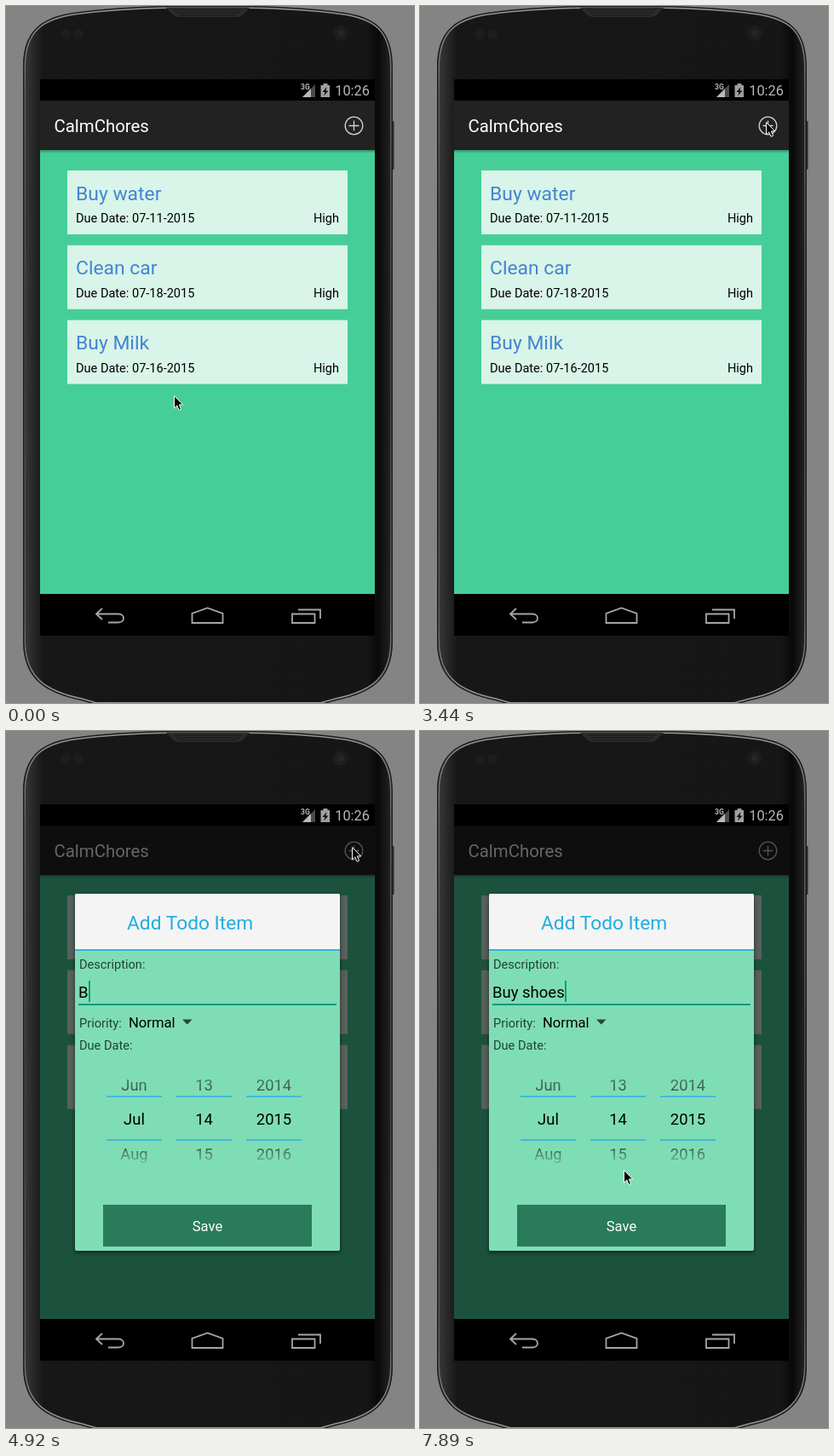
Write an HTML page that moves like this. It is 479 px wide and 818 px high and loops after 8000 ms.

```html
<!DOCTYPE html>
<html lang="en">
<head>
<meta charset="utf-8">
<title>To-do list</title>
<style>
html, body { margin: 0; width: 100%; height: 100%; overflow: hidden; background: #848484; }
svg { display: block; width: 479px; height: 818px; font-family: Roboto, sans-serif; }
.small { font-size: 14.55px; }
.head { font-size: 22.9px; fill: #4285d0; }
.pick { font-size: 18.4px; text-anchor: middle; }
.label { font-size: 14.6px; fill: #204336; }
.nav { fill: none; stroke: #a6a6a6; stroke-width: 1.8; }
</style>
</head>
<body>
<svg viewBox="0 0 479 818" xmlns="http://www.w3.org/2000/svg">
  <defs>
    <path id="shell" d="M20 72C20 28 42 12 85 7Q130 1 190 0H285Q348 1 392 7C434 12 454 28 454 72V745C454 790 430 806 388 815L370 820H105L88 815C46 806 20 790 20 745Z"/>
    <clipPath id="inside"><use href="#shell"/></clipPath>
    <linearGradient id="rim" x1="0" y1="0" x2="0" y2="1">
      <stop offset="0" stop-color="#999"/>
      <stop offset=".12" stop-color="#606060"/>
      <stop offset=".5" stop-color="#444"/>
      <stop offset=".88" stop-color="#5c5c5c"/>
      <stop offset="1" stop-color="#999"/>
    </linearGradient>
    <linearGradient id="side" gradientUnits="userSpaceOnUse" x1="20" y1="0" x2="454" y2="0">
      <stop offset="0" stop-color="#3c3c3c"/>
      <stop offset=".025" stop-color="#2a2a2a"/>
      <stop offset=".055" stop-color="#171717"/>
      <stop offset=".93" stop-color="#161616"/>
      <stop offset=".96" stop-color="#090909"/>
      <stop offset="1" stop-color="#262626"/>
    </linearGradient>
    <linearGradient id="drop" x1="0" y1="0" x2="0" y2="1">
      <stop offset="0" stop-opacity=".3"/>
      <stop offset="1" stop-opacity="0"/>
    </linearGradient>
    <linearGradient id="fadeTop" gradientUnits="userSpaceOnUse" x1="0" y1="406" x2="0" y2="424">
      <stop offset="0" stop-opacity=".4"/>
      <stop offset="1" stop-opacity=".62"/>
    </linearGradient>
    <linearGradient id="fadeEnd" gradientUnits="userSpaceOnUse" x1="0" y1="488" x2="0" y2="507">
      <stop offset="0" stop-opacity=".62"/>
      <stop offset="1" stop-opacity=".15"/>
    </linearGradient>
    <filter id="soft" x="-10%" y="-10%" width="120%" height="120%"><feGaussianBlur stdDeviation="2.5"/></filter>
  </defs>

  <rect width="479" height="818" fill="#848484"/>
  <rect x="453" y="135" width="2.500" height="57" rx="1" fill="#2a2a2a"/>
  <g clip-path="url(#inside)">
    <use href="#shell" fill="url(#side)"/>
    <g fill="none">
      <use href="#shell" stroke="url(#rim)" stroke-width="6"/>
      <use href="#shell" stroke="#1c1c1c" stroke-width="3"/>
    </g>
  </g>
  <path d="M188 2H286L279 9Q276 13 271 13H204Q198 13 195 9Z" fill="#2b2b2b"/>
  <path d="M196 5H278M199 8H275M203 11H271" stroke="#181818"/>
  <g fill="#1d1d1d">
    <circle cx="70" cy="33" r="6"/><circle cx="85" cy="33" r="6"/>
    <circle cx="393" cy="32" r="9"/>
  </g>
  <circle cx="393" cy="32" r="4" fill="#24262a"/>

  <rect x="40" y="86" width="393" height="653"/>
  <g fill="#b8b8b8">
    <text x="346" y="98" font-size="8.5" font-weight="700">3G</text>
    <path d="M348 107L363 92V107Z" fill="#4a4a4a"/>
    <path d="M348 107L358 97V107Z"/>
    <path d="M369.500 93H372.500V91H377.500V93H380V107H369.500Z" fill="#a0a0a0"/>
    <path d="M376.500 95L371.500 101H374.500L373 105.500L378.500 99.500H375.500Z" fill="#111"/>
    <text x="427" y="105" font-size="16.4" text-anchor="end">10:26</text>
  </g>

  <rect x="40" y="111" width="393" height="58" fill="#222"/>
  <text x="56.500" y="148" font-size="20.4" fill="#fff">CalmChores</text>
  <g fill="none" stroke="#d0d0d0" stroke-width="1.300">
    <circle cx="408.500" cy="140.500" r="10.300"/>
    <path d="M402.500 140.500H414.500M408.500 134.500V146.500"/>
  </g>
  <rect x="40" y="169" width="393" height="521" fill="#46ce99"/>
  <rect x="40" y="169" width="393" height="4" fill="url(#drop)"/>
  <g id="cards"></g>
  <rect id="dim" x="40" y="111" width="393" height="579"/>

  <g class="nav">
    <path d="M113 707L106 713.500L113 720M106 713.500H132C140 713.500 140 723.500 132 723.500H120"/>
    <path d="M218.500 724V713L236.500 706.500L254.500 713V724Z"/>
    <path d="M336 713.500H362.500V724H336ZM343 708.500H369V719"/>
  </g>

  <g id="dialog">
    <rect x="81" y="193" width="311" height="419" filter="url(#soft)" opacity=".55"/>
    <rect x="81" y="191" width="311" height="419" rx="2" fill="#7fddb5"/>
    <path d="M81 257V193Q81 191 83 191H390Q392 191 392 193V257Z" fill="#f4f4f4"/>
    <rect x="81" y="256" width="311" height="2" fill="#2fb3e0"/>
    <text x="142" y="232.500" font-size="22.75" fill="#22addf">Add Todo Item</text>
    <g class="label">
      <text x="86" y="279">Description:</text>
      <text x="86" y="347.500">Priority:</text>
      <text x="86" y="374">Due Date:</text>
    </g>
    <text id="entry" x="85" y="313" font-size="18.5"></text>
    <rect id="caret" y="293" width="2" height="25" fill="#109a80"/>
    <rect x="85" y="320" width="303" height="2" fill="#109a80"/>
    <text x="144" y="348" font-size="16.6">Normal</text>
    <path d="M207 338.500H218.500L212.800 344.500Z" fill="#23483b"/>
    <g id="pickers"></g>
    <rect x="114" y="556" width="245" height="49" fill="#297b5b"/>
    <text x="236.500" y="587" font-size="16.6" fill="#fff" text-anchor="middle">Save</text>
  </g>
  <path id="mouse" d="M0 0V14.500L3.300 11.400L5.600 16.800L8.100 15.700L5.800 10.400H10.200Z" stroke="#fff"/>
</svg>
<script>
const LOOP = 8000, TICK = 148;
const el = id => document.getElementById(id);
const smooth = p => p * p * (3 - 2 * p);

el('cards').innerHTML = [['Buy water', '11'], ['Clean car', '18'], ['Buy Milk', '16']]
  .map(([name, day], i) => `<g transform="translate(72 ${193 + i * 87.8})">
    <rect width="329" height="75" fill="#d9f4e8"/>
    <text class="head" x="10" y="34.500">${name}</text>
    <text class="small" x="10" y="61">Due Date: 07-${day}-2015</text>
    <text class="small" x="319" y="61" text-anchor="end">High</text></g>`).join('');

el('pickers').innerHTML = [['Jun', 'Jul', 'Aug'], [13, 14, 15], [2014, 2015, 2016]]
  .map(([before, now, after], i) => {
    const x = 150.5 + i * 82;
    return `<g class="pick">
      <text x="${x}" y="422" fill="url(#fadeTop)">${before}</text>
      <text x="${x}" y="462">${now}</text>
      <text x="${x}" y="502.500" fill="url(#fadeEnd)">${after}</text></g>
      <path d="M${x - 32.5} 429h65m-65 51h65" stroke="#3fbbd6" stroke-width="2"/>`;
  }).join('');

// Each list holds [start time, value]; a value stays until the next one.
const typed = [[0, ''], [4920, 'B'], [5220, 'Bu'], [5370, 'Buy'], [5810, 'Buy '],
  [6260, 'Buy s'], [6400, 'Buy sh'], [6550, 'Buy shoe'], [6850, 'Buy shoes']];
const blink = [[0, 1], [4030, 0], [4630, 1], [7450, 0], [7890, 1]];
const shown = [[0, 0], [3590, .8], [3730, 1]];
const shade = [[0, 0], [3590, .2], [3730, .6]];
const reach = [[0, [197.5, 457.5]], [150, [361, 447]], [300, [392, 338]], [450, [404, 236]],
  [590, [412, 162]], [740, [415, 122]], [890, [414, 112.5]], [1040, [412, 116]],
  [1190, [411, 122.5]], [1340, [405, 134.5]], [2540, [405.5, 135.5]], [3140, [406.5, 136.5]]];

function at(list, t) {
  let value = list[0][1];
  for (const [start, v] of list) if (t >= start) value = v;
  return value;
}

function mouseAt(t) {
  const from = at(reach, t);
  if (t < 7150) return from;
  const step = Math.min(6, Math.floor((t - 7150) / TICK) + 1);
  const p = smooth(step / 6);
  return [from[0] + (239.5 - from[0]) * p, from[1] + (515.5 - from[1]) * p];
}

function draw(t) {
  const alpha = at(shown, t), scale = alpha < 1 ? .987 : 1;
  const dialog = el('dialog'), entry = el('entry');
  dialog.style.display = alpha ? '' : 'none';
  dialog.setAttribute('opacity', alpha);
  dialog.setAttribute('transform', `translate(236.5 400.5) scale(${scale}) translate(-236.5 -400.5)`);
  el('dim').setAttribute('opacity', at(shade, t));
  const text = at(typed, t).replace(/ /g, '\u00a0');
  if (entry.textContent !== text) entry.textContent = text;
  const end = text && alpha ? entry.getComputedTextLength() : 0;
  el('caret').setAttribute('x', Math.round(85 + end));
  el('caret').setAttribute('opacity', at(blink, t));
  el('mouse').setAttribute('transform', `translate(${mouseAt(t)})`);
}

const begin = performance.now();
function frame() {
  draw((performance.now() - begin) % LOOP);
  requestAnimationFrame(frame);
}
draw(0);
requestAnimationFrame(frame);
</script>
</body>
</html>
```
